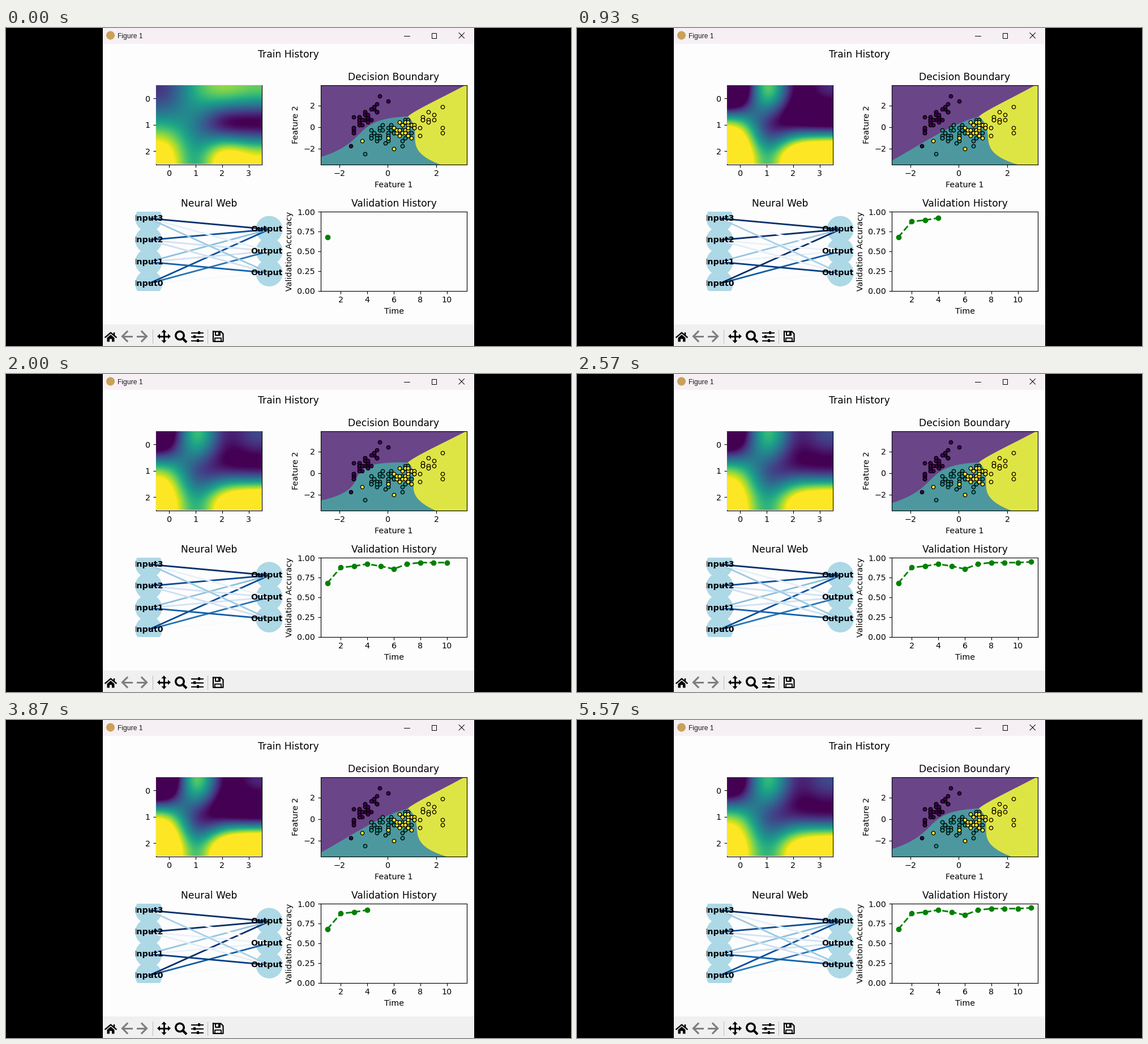
A matplotlib script that plays this animation: 998 by 561 pixels, repeating every 5600 ms.

```python
import numpy as np
import matplotlib.pyplot as plt
from matplotlib.animation import FuncAnimation
from matplotlib.collections import LineCollection
from matplotlib.patches import Circle, Polygon, Rectangle

W, H, DPI = 998, 561, 100
FRAMES, INTERVAL = 140, 40
EPOCHS, EPOCH_MS = 11, 190
S = 1.025  # window zoom

plt.rcParams.update({
    "font.family": "DejaVu Sans", "font.size": 10 * S,
    "axes.titlesize": 12 * S, "axes.titlepad": 6 * S,
    "axes.labelsize": 10 * S, "axes.labelpad": 4 * S,
    "axes.linewidth": 0.8 * S, "axes.facecolor": "#fefdfe",
})
for axis in ("xtick", "ytick"):
    plt.rcParams.update({f"{axis}.major.size": 3.5 * S, f"{axis}.major.pad": 3.5 * S,
                         f"{axis}.major.width": 0.8 * S})

fig = plt.figure(figsize=(W / DPI, H / DPI), dpi=DPI, facecolor="black")


def panel(x0, y0, x1, y1, **kw):
    """Axes placed by pixel corners, y pointing down."""
    return fig.add_axes([x0 / W, 1 - y1 / H, (x1 - x0) / W, (y1 - y0) / H], **kw)


# ---------- window chrome ----------
ui = panel(0, 0, W, H, zorder=-1)
ui.set(xlim=(0, W), ylim=(H, 0))
ui.axis("off")


def box(x0, y0, x1, y1, color):
    ui.add_patch(Rectangle((x0, y0), x1 - x0, y1 - y0, fc=color, lw=0))


def stroke(pts, color="black", px=1.0, **kw):
    x, y = zip(*pts)
    ui.plot(x, y, color=color, lw=px * 72 / DPI, **kw)


def shape(pts):
    ui.add_patch(Polygon(pts, fc="black", lw=0))


def title_bar():
    ui.add_patch(Circle((184.5, 13), 7.5, fc="#c9a15a", lw=0))
    ui.text(197, 17.5, "Figure 1", family="Liberation Sans", size=8.7, color="#1a1a1a")
    stroke([(703.5, 13.5), (713.5, 13.5)])
    stroke([(752, 9), (760.5, 9), (760.5, 17.5), (752, 17.5), (752, 9)])
    stroke([(800, 8.5), (809.5, 18)])
    stroke([(800, 18), (809.5, 8.5)])


def toolbar():
    # home
    stroke([(175.5, 545.5), (185, 537.5), (194.5, 545.5)], px=2.4)
    stroke([(190.8, 537), (190.8, 542)], px=2.4, solid_capstyle="butt")
    shape([(178.5, 546.5), (185, 541), (191.5, 546.5), (191.5, 553.5), (187, 553.5),
           (187, 548.5), (183, 548.5), (183, 553.5), (178.5, 553.5)])
    # back and forward
    for cx, d in ((213.5, -1), (240.5, 1)):
        stroke([(cx - 8.5 * d, 544), (cx + 7 * d, 544)], "#7f7f7f", 3)
        stroke([(cx - 0.5 * d, 535.5), (cx + 8 * d, 544), (cx - 0.5 * d, 552.5)],
               "#7f7f7f", 3.2, solid_joinstyle="miter")
    for x in (259.5, 356.5):
        stroke([(x, 532), (x, 556)], "#bcbcbc")
    # pan
    cx, cy = 279, 544
    for dx, dy in ((1, 0), (-1, 0), (0, 1), (0, -1)):
        bx, by = cx + 7 * dx, cy + 7 * dy
        stroke([(cx, cy), (bx, by)], px=3)
        shape([(cx + 12 * dx, cy + 12 * dy),
               (bx + 4.5 * dy, by + 4.5 * dx), (bx - 4.5 * dy, by - 4.5 * dx)])
    # zoom
    ui.add_patch(Circle((307, 542.5), 7.2, fc="none", ec="black", lw=2.5))
    stroke([(312.5, 548), (317.5, 553)], px=4.2)
    # sliders
    for y, knob in ((537.5, 341.5), (544.5, 333), (551.5, 339)):
        stroke([(328, y), (348, y)], px=2)
        stroke([(knob, y - 2.6), (knob, y + 2.6)], px=4, solid_capstyle="butt")
    # save
    stroke([(366, 535.5), (379.5, 535.5), (383.5, 539.5), (383.5, 553), (366, 553),
            (366, 535.5)], px=2.2)
    stroke([(370, 536), (370, 541.5), (378.5, 541.5), (378.5, 536)], px=2)
    box(374.8, 536, 378, 541, "black")
    stroke([(369.5, 553), (369.5, 547), (380, 547), (380, 553)], px=1.8)


box(171, 0, 827, 28, "#f6f0f5")
box(171, 28, 827, 523, "#fefdfe")
box(171, 523, 827, 561, "#f0f0f0")
title_bar()
toolbar()
ui.text(499, 51.8, "Train History", size=12 * S, ha="center")

# ---------- training model ----------
# rows: outputs, columns: inputs; shared by the heat map and the network
UNTRAINED = np.array([[0.30, 0.58, 0.70, 0.63], [0.53, 0.44, -0.03, 0.02],
                      [0.86, 0.39, 0.95, 0.77]])
TRAINED = np.array([[0.02, 0.80, 0.22, 0.38], [0.72, 0.20, 0.20, 0.10],
                    [0.87, 0.42, 0.87, 1.00]])
LOW, HIGH = 0.25, 0.72
CORRECT = np.array([76, 98, 100, 103, 100, 96, 103, 105, 105, 105, 106])


def weights(n):
    """Move to the trained weights with a contrast that swings and settles."""
    swing = 0.45 * np.cos(np.pi * (n - 4) / 3) * np.exp((4 - n) / 3)
    mid = (LOW + HIGH) / 2
    goal = mid + (1 + swing) * (TRAINED - mid)
    return UNTRAINED + min((n - 1) / 3, 1) * (goal - UNTRAINED)


def bezier(flat, bulged, amount):
    """Cubic curve between two control polygons."""
    a, b, c, d = (1 - amount) * np.array(flat) + amount * np.array(bulged)
    t = np.linspace(0, 1, 50)[:, None]
    return (1 - t)**3 * a + 3 * t * (1 - t)**2 * b + 3 * t**2 * (1 - t) * c + t**3 * d


def borders(n):
    """Class borders in pixels, all meeting at one point."""
    bulge = np.exp(-((n - 9.4) / 2)**2)
    hub = (710, 156)
    left = bezier([(556, 234), (620, 198), (660, 170), hub],
                  [(556, 222), (670, 200), (560, 152), hub], bulge)
    right = bezier([hub, (745, 186), (697, 216), (778, 241)],
                   [hub, (738, 185), (690, 210), (757, 241)], bulge)
    top = bezier([hub, (720, 146), (772, 122), (809, 101)],
                 [hub, (720, 146), (772, 122), (813, 101)], bulge)
    return left, right, top


def epoch_at(ms):
    start = 230 if ms < 2750 else 3110
    return int(np.clip(1 + (ms - start) // EPOCH_MS, 1, EPOCHS))


# ---------- heat map ----------
heat = panel(265, 101, 452, 240.5)
image = heat.imshow(UNTRAINED, cmap="viridis", vmin=LOW, vmax=HIGH, aspect="auto",
                    interpolation="bicubic", zorder=3)
heat.set(xticks=range(4), yticks=range(3))

# ---------- decision boundary ----------
bound = panel(556, 101, 814, 240.5, facecolor="#6a4588")
teal = Polygon([(0, 0)] * 3, fc="#4d989f", lw=0, transform=ui.transData)
yellow = Polygon([(0, 0)] * 3, fc="#dde545", lw=0, transform=ui.transData)
bound.add_patch(teal)
bound.add_patch(yellow)

rng = np.random.default_rng(4)


def flowers(mean, std, corr, outliers, color):
    """Correlated cloud of sepal sizes in whole mm, plus its outliers."""
    u, v = np.clip(rng.normal(size=(2, 34)), -1.6, 1.6)
    v = corr * u + np.sqrt(1 - corr**2) * v
    cloud = np.column_stack([mean[0] + std[0] * u, mean[1] + std[1] * v]).round()
    x, y = np.vstack([cloud, outliers]).T
    bound.scatter((x - 57.9) / 8.45, (y - 30.2) / 4.09, s=21, c=color,
                  edgecolors="black", linewidths=0.95, zorder=2)


flowers((50, 33.6), (2.8, 3.0), 0.74, [(45, 23), (55, 42), (58, 40)], "#440154")
flowers((59, 27.9), (4.6, 2.7), 0.53, [(50, 20), (63, 23), (63, 25)], "#21918c")
flowers((65.5, 29.7), (5, 2.4), 0.46,
        [(49, 25), (60, 22), (72, 36), (77, 38), (77, 28), (77, 30)], "#fde725")
bound.set(xlim=(-2.764, 3.255), ylim=(-3.474, 3.895), xticks=(-2, 0, 2), yticks=(-2, 0, 2),
          title="Decision Boundary", xlabel="Feature 1", ylabel="Feature 2")

# ---------- network ----------
net = panel(229, 324, 488, 463.5)
net.set(xlim=(229, 488), ylim=(463.5, 324), title="Neural Web")
net.axis("off")
inputs = [(252, 451 - 38.4 * i) for i in range(4)]
outputs = [(465, 432.2 - 38.5 * j) for j in range(3)]
for name, nodes in (("Input", inputs), ("Output", outputs)):
    for i, (x, y) in enumerate(nodes):
        net.add_patch(Circle((x, y), 23.7, fc="lightblue", lw=0))
        net.text(x, y, f"{name}{i}", weight="bold", ha="center", va="center",
                 clip_on=True, zorder=4)
edges = LineCollection([(a, b) for a in inputs for b in outputs], linewidths=2 * S, zorder=2)
net.add_collection(edges)

# ---------- validation ----------
valid = panel(556, 324, 814, 463.5)
curve, = valid.plot([], [], "go--", lw=2 * S, ms=6)
valid.set(xlim=(0.5, 11.5), ylim=(0, 1), xticks=range(2, 11, 2),
          yticks=np.linspace(0, 1, 5), title="Validation History",
          xlabel="Time", ylabel="Validation Accuracy")


def update(frame):
    n = epoch_at(frame * INTERVAL)
    image.set_data(weights(n))
    curve.set_data(range(1, n + 1), CORRECT[:n] / 112)

    # network and borders keep the last run's state until the second epoch
    shown = n if n > 1 else EPOCHS
    edges.set_color(plt.cm.Blues(weights(shown).T.ravel()))
    left, right, top = borders(shown)
    teal.set_xy(np.vstack([left, right, [(556, 242)]]))
    yellow.set_xy(np.vstack([top, [(816, 101), (816, 242)], right[::-1]]))
    return image, edges, teal, yellow, curve


anim = FuncAnimation(fig, update, frames=FRAMES, interval=INTERVAL, repeat=True)
plt.show()
```
